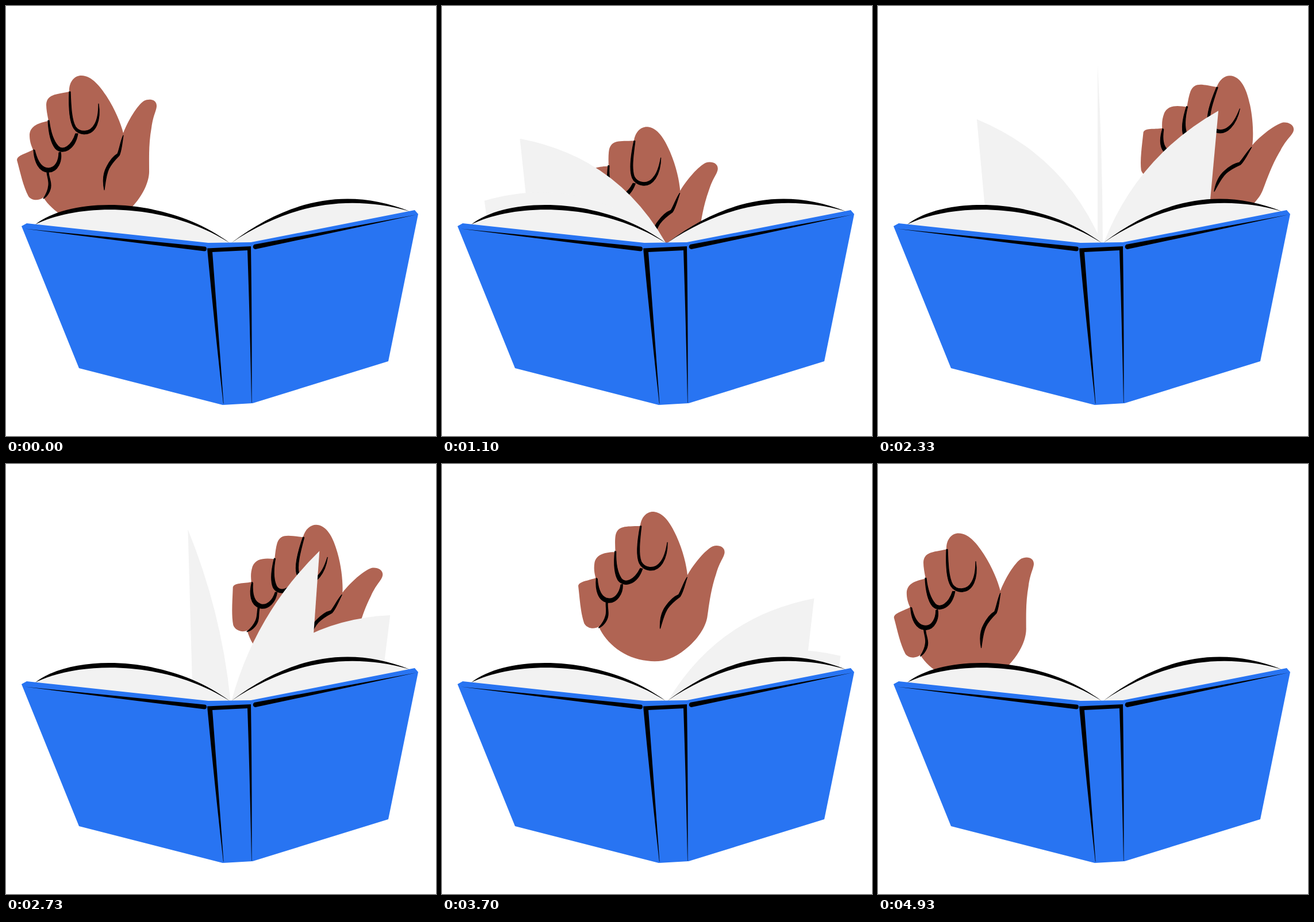
Recreate the animation shown at these times as an HTML page. Size 748 px wide and 748 px high, loop 5010 ms.

```html
<!DOCTYPE html>
<html lang="en">
<head>
<meta charset="utf-8">
<title>Turning pages</title>
<style>
  html, body { margin: 0; width: 100%; height: 100%; overflow: hidden; background: #fff; }
  svg { display: block; width: 100%; height: 100%; }
  .skin { fill: #b06453; }
  .paper { fill: #f2f2f2; }
  .cover { fill: #2874f2; }
  .crease { stroke: #000; stroke-width: 1.2; stroke-linejoin: round; }
</style>
</head>
<body>
<svg viewBox="0 0 748 748">
  <g id="hand">
    <path class="skin" d="M110 150C109 132 119 121 131 121C150 121 165 142 175 157C190 180 200 205 204 221
      C212 200 228 173 240 165C250 160 263 163 262 175C261 184 256 190 253 212C248 240 249 265 249 285
      C250 305 238 330 219 350C200 371 180 379 157 379C118 381 82 360 65 333C56 340 44 338 39 331
      C30 314 25 290 19 268C19 260 34 257 47 250C43 241 41 234 41 224C42 208 58 203 74 200
      C72 190 70 180 70 172C71 154 85 154 110 149Z"/>
    <g class="crease">
      <path d="M110 149C109 175 110 200 118 213C126 226 149 228 158 207C163 195 163 182 161 170
        C161 185 159 198 154 206C146 221 128 220 121 210C114 198 113 175 112 149Z"/>
      <path d="M73 199C74 218 77 237 86 248C98 260 120 251 125 222L121 222C114 244 99 252 91 244C82 234 77 216 75 199Z"/>
      <path d="M48 250C49 270 57 290 75 289C90 288 98 270 95 254L92 255C92 270 85 282 74 282C61 282 54 268 50 251Z"/>
      <path d="M71 289C72 298 75 304 74 312C73 322 69 329 65 335C71 332 78 322 78 312C78 303 74 297 74 288Z"/>
      <path d="M204 225C202 238 201 252 197 260C190 267 184 273 179 283C174 293 173 306 171 320
        C168 305 169 291 175 280C180 270 187 261 194 257C198 247 199 236 204 225Z"/>
    </g>
  </g>
  <g id="pages" class="paper"></g>
  <path class="paper" d="M51 380C115 332 280 333 389 412L352 420ZM392 412C496 335 599 318 702 357L426 420Z"/>
  <path d="M51 380C115 330 280 331 389 412C280 342 130 341 51 380ZM392 412C496 333 599 316 702 357C599 328 496 342 392 412Z"/>
  <path class="cover" d="M27 383L36 378L352 412L426 411L711 355L717 362L665 618L429 691L377 694L127 630Z"/>
  <path d="M33 387.500L345 418.500A4 4 0 0 1 345 426.500ZM714 363L434 414.500A4.200 4.200 0 0 0 434 423Z"/>
  <path d="M350 421.500L426 418Q428 540 427.500 690L427 690Q424 540 420 425L359 428Q369 560 378.500 691L378 692Q361 540 350 421.500Z"/>
</svg>
<script>
const LOOP = 5010, STEP = 50, LAST = 99;
const REACH = 2350, RETURN = 2650;
const PAGES = 3, FIRST = 300, GAP = 550, TURN = 3000;

// one rise and fall over 0..1; skew below 1 brings the peak forward
const bump = (u, skew, power) => Math.max(0, Math.sin(Math.PI * u ** skew)) ** power;

// the hand dips to lift the pages, then arcs back over the book
function handPose(t) {
  if (t < REACH) {
    const u = t / REACH;
    const dip = 110 * bump(Math.min(1, u / 0.8), 0.92, 2);
    return { x: 480 * u, y: dip - 8 * bump(u, 1, 1), turn: 21 * u };
  }
  const v = (t - REACH) / RETURN;
  return { x: 480 * (1 - v), y: -38.5 * bump(v, 0.9, 1.5), turn: 21 * (1 - v) ** 1.25 };
}

// the corner swings over a half ellipse while the sheet bends upward
function pagePath(u) {
  if (u <= 0 || u >= 1) return "";
  const angle = Math.PI * u - 0.175 * Math.sin(2 * Math.PI * u);
  const c = Math.cos(angle), s = Math.sin(angle);
  const x = 382 - 313 * c;
  const y = 369 + 11 * c - (237 + 30 * s ** 6) * s;
  const base = 391 - 3 * c;
  const dx = x - base, dy = y - 411;
  const bend = (4 + 86 * c) / Math.hypot(dx, dy);
  const bx = base + dx / 2 - dy * bend;
  const by = 411 + dy / 2 + dx * bend;
  const foot = x + 0.136 * c * (420 - y);
  return `M${base} 425V411Q${bx} ${by} ${x} ${y}L${foot} 420Z`;
}

const hand = document.getElementById("hand");
const stack = document.getElementById("pages");
const pages = Array.from({ length: PAGES }, () =>
  stack.appendChild(document.createElementNS("http://www.w3.org/2000/svg", "path")));

// pictures hold for 30 and 70 ms in turn
function poseTime(ms) {
  const n = 2 * Math.floor(ms / 100) + (ms % 100 >= 30 ? 1 : 0);
  return Math.min(n, LAST) * STEP;
}

function draw(ms) {
  const t = poseTime(ms % LOOP);
  const { x, y, turn } = handPose(t);
  hand.setAttribute("transform", `translate(${x} ${y}) rotate(${turn} 131 143)`);
  pages.forEach((page, i) => page.setAttribute("d", pagePath((t - FIRST - GAP * i) / TURN)));
}

const start = performance.now();
function tick() {
  draw(performance.now() - start);
  requestAnimationFrame(tick);
}
tick();
</script>
</body>
</html>
```
